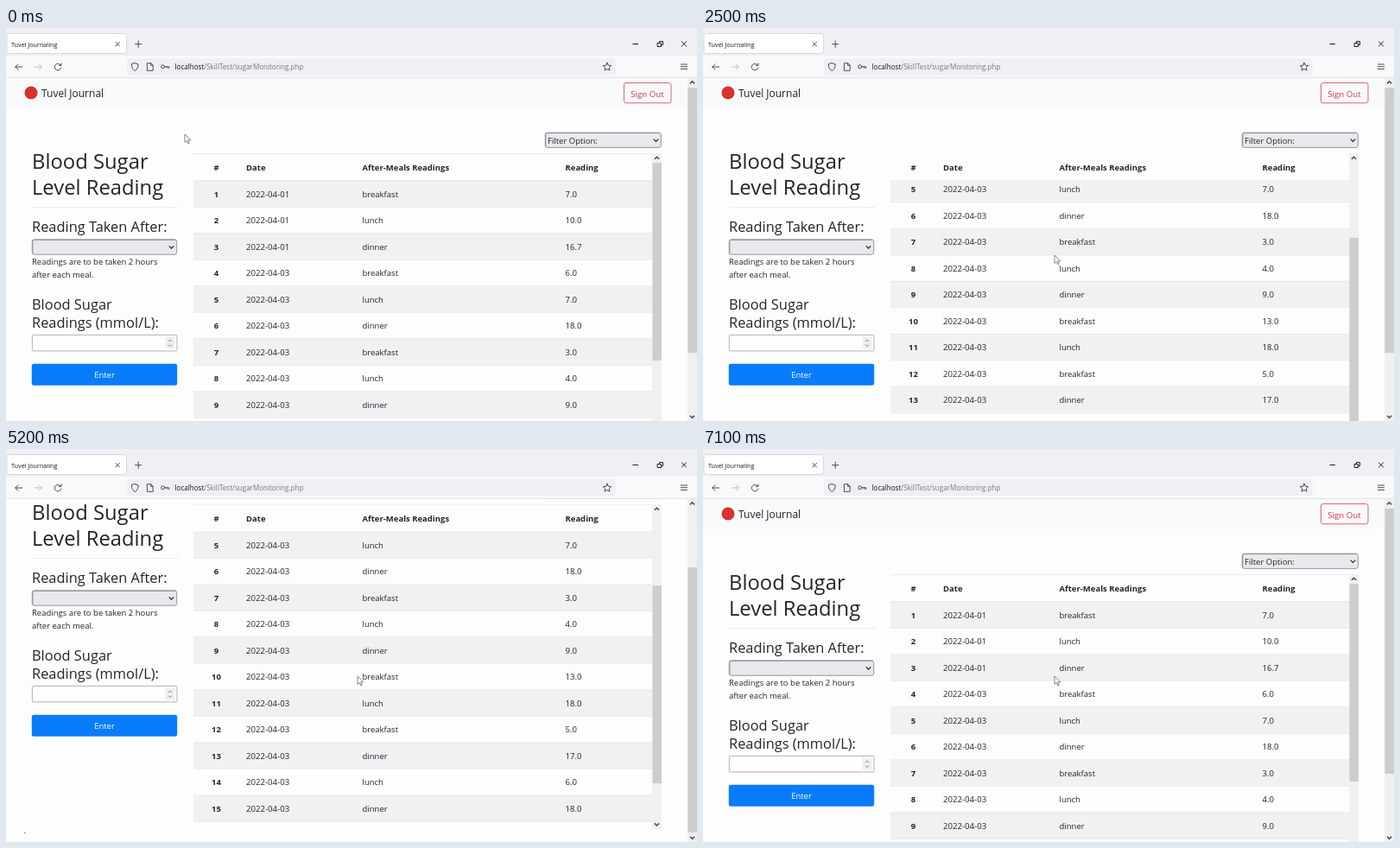
Recreate the animation shown at these times as an HTML page. Size 800x455 px, loop 7500 ms.

```html
<!DOCTYPE html>
<html lang="en">
<head>
<meta charset="utf-8">
<title>Tuvel Journaling</title>
<style>
  html, body { margin: 0; width: 100%; height: 100%; overflow: hidden; background: #fdfdfe; }
  svg { display: block; }
  text { font-family: "Open Sans", "Noto Sans", sans-serif; font-size: 9.5px; fill: #212529; white-space: pre; }
  .h1 { font-size: 23.8px; }
  .h3 { font-size: 16.4px; }
  .bold { font-weight: 700; }
  .num { font-size: 9.65px; }
  .mid { text-anchor: middle; }
  .icon { fill: none; stroke: #4a4a52; stroke-width: 1; stroke-linecap: round; stroke-linejoin: round; }
  .window { stroke: #222226; }
  .chevron { fill: none; stroke: #222; stroke-width: 1.2; }
  .arrow { fill: none; stroke: #4c4c50; stroke-width: 1.5; }
  .select { fill: #e9e8ed; stroke: #96959f; stroke-width: 1; }
</style>
</head>
<body>
<svg width="800" height="455" viewBox="0 0 800 455">
  <defs>
    <clipPath id="pageClip"><rect y="57.5" width="800" height="398"/></clipPath>
    <clipPath id="tableClip"><rect x="217" y="145" width="542" height="376"/></clipPath>
    <path id="chevron" class="chevron" d="M-2.7-1.4L0 1.4L2.7-1.4"/>
  </defs>
  <rect width="800" height="455" fill="#fdfdfe"/>

  <g clip-path="url(#pageClip)">
    <g id="page">
      <rect y="57" width="789" height="35.5" fill="#f8f9fa"/>
      <circle cx="29" cy="75" r="7.5" fill="#d9312d"/>
      <text x="41" y="80" style="font-size:12px">Tuvel Journal</text>
      <rect x="715.5" y="63.5" width="54.5" height="23.3" rx="2.5" fill="none" stroke="#dc3545" stroke-width=".75"/>
      <text class="mid" x="742.5" y="79.5" style="font-size:9.7px;fill:#dc3545">Sign Out</text>

      <rect class="select" x="624.3" y="121.2" width="134" height="17.2" rx="2.5"/>
      <path d="M624.9 137V123.5Q624.9 121.6 626.8 121.6H757" fill="none" stroke="#85838e" stroke-width=".8"/>
      <text x="627" y="133.5">Filter Option:</text>
      <use href="#chevron" x="752.5" y="130"/>

      <text class="h1" x="30" y="163">Blood Sugar</text>
      <text class="h1" x="30" y="193">Level Reading</text>
      <path d="M30 207.7H199" stroke="#e6e6e8" stroke-width=".8"/>
      <text class="h3" x="30" y="235.6">Reading Taken After:</text>
      <rect class="select" x="30.3" y="244.9" width="167.4" height="17.3" rx="2.5"/>
      <path d="M30.9 261V247.2Q30.9 245.3 32.8 245.3H196.5" fill="none" stroke="#85838e" stroke-width=".8"/>
      <use href="#chevron" x="191.5" y="253.8"/>
      <text x="30" y="274.4">Readings are to be taken 2 hours</text>
      <text x="30" y="289.4">after each meal.</text>
      <text class="h3" x="30" y="325.9">Blood Sugar</text>
      <text class="h3" x="30" y="346.8">Readings (mmol/L):</text>
      <rect x="30.4" y="355.4" width="167.6" height="18.5" rx="1.2" fill="#fefefe" stroke="#acacb2" stroke-width=".9"/>
      <rect x="184.5" y="358" width="11" height="13.5" fill="#efeff1"/>
      <path d="M188 363L190 361L192 363M188 366.6L190 368.6L192 366.6" fill="none" stroke="#77777d" stroke-width=".9"/>
      <rect x="29.8" y="388.8" width="168.4" height="25" rx="2.5" fill="#097cfb"/>
      <text class="mid" x="114" y="405.4" style="fill:#fff">Enter</text>
      <text x="20.5" y="525.5">.</text>

      <g clip-path="url(#tableClip)">
        <g id="rows"></g>
        <rect x="217" y="145.9" width="531" height="30.4" fill="#fdfdfe"/>
        <g id="head" class="bold">
          <text class="mid" x="243.5" y="165">#</text>
          <text x="278" y="165">Date</text>
          <text x="412.5" y="165">After-Meals Readings</text>
          <text x="647.5" y="165">Reading</text>
        </g>
        <rect x="748" y="145" width="11" height="376" fill="#f0f0f1"/>
        <rect id="tableThumb" x="748.5" y="156" width="10.5" height="229" fill="#cdcdce"/>
        <path class="arrow" d="M750.9 151.8L753.5 149.2L756.1 151.8M750.9 514.4L753.5 517L756.1 514.4"/>
      </g>
    </g>
    <rect x="789" y="57" width="11" height="398" fill="#f0f0f1"/>
    <rect id="pageThumb" x="789.3" y="69" width="10.7" height="307" fill="#cdcdce"/>
    <path class="arrow" d="M792 64.4L794.6 61.8L797.2 64.4M792 448.8L794.6 451.4L797.2 448.8"/>
  </g>

  <g id="browser">
    <rect width="800" height="32" fill="#f0f0f4"/>
    <rect y="32" width="800" height="25.5" fill="#f9f9fb"/>
    <path d="M0 57.4H800" stroke="#dcdce1" stroke-width=".8"/>
    <rect x="1" y="6.5" width="138.6" height="23" rx="2.5" fill="#fff" stroke="#cfcfd6" stroke-width=".8"/>
    <text x="6" y="21.5" style="font-size:7.2px;fill:#15141a">Tuvel Journaling</text>
    <rect x="140" y="35.5" width="565.5" height="19" rx="2.5" fill="#f0f0f4"/>
    <text x="195.5" y="48.4" style="font-size:8.05px;fill:#15141a">localhost<tspan fill="#77767e">/SkillTest/sugarMonitoring.php</tspan></text>
    <g class="icon">
      <path d="M126.9 16.4l4.6 4.6m0-4.6l-4.6 4.6M153.2 15v7.4m-3.7-3.7h7.4"/>
      <path d="M18.7 45H10.8m3.2-3.2L10.8 45l3.2 3.2"/>
      <path d="M33.3 45h8m-3.2-3.2l3.2 3.2l-3.2 3.2" stroke="#bdbdc4"/>
      <path d="M63.3 43.1A3.8 3.8 0 1 0 63.8 46M64 40.9v2.5h-2.5"/>
      <path d="M149.3 40.6l3.8 1.3c.2 3.6-1 6-3.8 7.7c-2.8-1.7-4-4.1-3.8-7.7z"/>
      <path d="M163.8 40.7h4l2.4 2.4v6.2h-6.4zM167.6 40.9v2.4h2.4"/>
      <circle cx="181.6" cy="44.8" r="2"/>
      <path d="M183.7 44.8h5v1.8m-2-1.8v1.4"/>
      <path d="M696 40.2l1.4 3l3.3.4l-2.4 2.3l.6 3.2l-2.9-1.6l-2.9 1.6l.6-3.2l-2.4-2.3l3.3-.4z"/>
      <path d="M781.4 42h7.2m-7.2 2.7h7.2m-7.2 2.7h7.2"/>
      <path class="window" d="M725.8 18.5h5.8M754.5 17.5h4v4h-4zM756.5 17.2v-1.7h4v4h-1.7M782.4 15.8l5.2 5.2m0-5.2l-5.2 5.2"/>
    </g>
  </g>
  <path id="cursor" d="M0 0V9.4L2.2 7.4L3.8 10.9L5.3 10.2L3.7 6.9H6.7Z" fill="#fff" stroke="#68686d" stroke-width=".8" stroke-linejoin="round"/>
</svg>
<script>
const LOOP = 7500, STEP = 100;
const ROW = 30.5, TABLE_MAX = 183.5, PAGE_MAX = 81;
const el = id => document.getElementById(id);

const meals = { b: 'breakfast', l: 'lunch', d: 'dinner' };
const readings = 'b7.0 l10.0 d16.7 b6.0 l7.0 d18.0 b3.0 l4.0 d9.0 b13.0 l18.0 b5.0 d17.0 l6.0 d18.0 d10.0 d6.0'.split(' ');

function rowMarkup(entry, i) {
  const top = 176.8 + i * ROW, base = top + 19;
  const fill = i % 2 ? '#fdfdfe' : '#f1f0f2';
  return `<rect x="217" y="${top}" width="531" height="${ROW}" fill="${fill}"/>
    <path d="M217 ${top}H748" stroke="#e2e3e7" stroke-width=".7"/>
    <text class="mid bold" x="243.5" y="${base}">${i + 1}</text>
    <text class="num" x="278" y="${base}">2022-04-${i < 3 ? '01' : '03'}</text>
    <text x="412.5" y="${base}">${meals[entry[0]]}</text>
    <text class="num" x="647.5" y="${base}">${entry.slice(1)}</text>`;
}
el('rows').innerHTML = readings.map(rowMarkup).join('') +
  '<path d="M217 145.4H748M217 176.6H748" stroke="#e0e2e6" stroke-width=".9"/>';

// Keys are [time, value] pairs, joined linearly.
const tableKeys = [
  [1300, 0], [1400, 28.5], [1500, 46], [1700, 61], [1800, 84], [1900, 103], [2100, 119], [2300, 122],
  [2400, 122], [2500, 127.5], [2600, 150], [2700, 167], [2800, 177], [3000, TABLE_MAX],
  [4800, TABLE_MAX], [4900, 172], [5200, 122], [5600, 63], [5700, 57], [6000, 33.5], [6200, 8], [6300, 0]
];
const pageKeys = [
  [3200, 0], [3300, 1], [3400, 2], [3500, 2], [3600, 9], [3700, 25], [3900, 60], [4100, 79], [4200, PAGE_MAX],
  [6400, PAGE_MAX], [6600, 75], [6700, 75], [6800, 56], [6900, 28], [7000, 8], [7100, 0]
];

function sample(keys, t) {
  const i = keys.findIndex(k => k[0] > t);
  if (i === 0) return keys[0][1];
  if (i < 0) return keys[keys.length - 1][1];
  const [t0, v0] = keys[i - 1], [t1, v1] = keys[i];
  return v0 + (v1 - v0) * (t - t0) / (t1 - t0);
}

function pointer(t) {
  if (t < 100) return [207, 123];
  const u = Math.min(1, Math.max(0, (t - 500) / 500));
  const e = u * u * (3 - 2 * u);
  return [651 - 244 * e, 127 + 136 * e];
}

const move = (id, x, y) => el(id).setAttribute('transform', `translate(${x} ${y})`);

function draw(now) {
  const t = Math.floor(now % LOOP / STEP) * STEP;
  const table = sample(tableKeys, t), page = sample(pageKeys, t);
  move('page', 0, -page);
  move('rows', 0, -table);
  move('head', 0, -Math.min(table, 0.5));
  move('tableThumb', 0, table / TABLE_MAX * 125);
  move('pageThumb', 0, page / PAGE_MAX * 68);
  move('cursor', ...pointer(t));
}

const start = performance.now();
function tick() {
  draw(performance.now() - start);
  requestAnimationFrame(tick);
}
tick();
</script>
</body>
</html>
```
